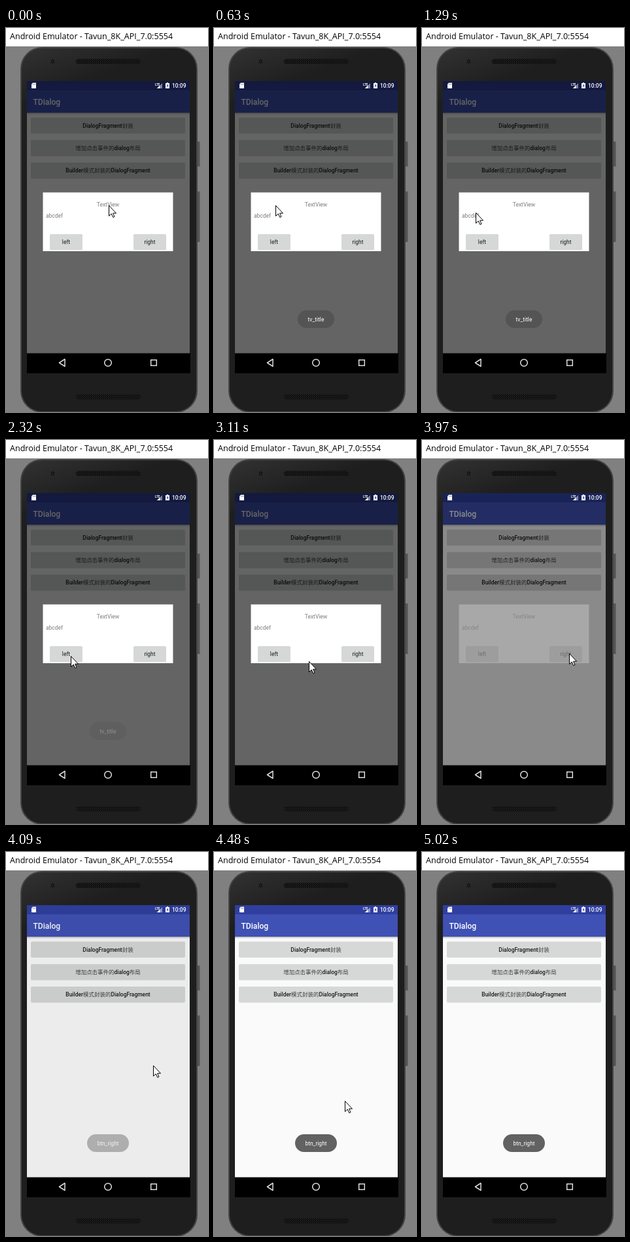
An HTML page for the animation above (5.76 s loop, 309 by 585 pixels).

```html
<!DOCTYPE html>
<html lang="en">
<head>
<meta charset="utf-8">
<title>Dialog demo</title>
<style>
  html, body { margin: 0; width: 100%; height: 100%; overflow: hidden; background: #808080; }
  svg { display: block; width: 100%; height: 100%; }
  text { font: 8.48px Roboto, "Noto Sans CJK SC", "Noto Sans CJK", sans-serif; }
  .medium { font-weight: 500; }
  .mid { text-anchor: middle; }
  .button { fill: #d6d7d7; }
  .label { fill: #1a1a1a; }
  .han { font-weight: 400; fill-opacity: .8; }
  .hint { fill: #7c7c7c; }
  .white { fill: #fff; }
</style>
</head>
<body>
<svg viewBox="0 0 309 585">
  <defs>
    <pattern id="mesh" width="3" height="3" patternUnits="userSpaceOnUse">
      <rect width="3" height="3" fill="#0b0b0b"/>
      <path d="M0 0h1v1h-1zM1.5 1.5h1v1h-1z" fill="#383838"/>
    </pattern>
    <linearGradient id="shade" x2="0" y2="1">
      <stop stop-opacity=".28"/>
      <stop offset="1" stop-opacity="0"/>
    </linearGradient>
    <linearGradient id="gloss" gradientUnits="userSpaceOnUse" x1="60" y1="30" x2="85" y2="95">
      <stop stop-color="#2f2f2f"/>
      <stop offset="1" stop-color="#1e1e1e"/>
    </linearGradient>
  </defs>

  <rect width="309" height="585" fill="#808080"/>
  <rect width="309" height="28" fill="#fff"/>
  <text x="6" y="17" style="font:12.55px 'Open Sans','Noto Sans',sans-serif">Android Emulator - Tavun_8K_API_7.0:5554</text>

  <g id="phone">
    <path d="M293 173h3.500v38h-3.500zM293 249h3.500v77h-3.500z" fill="#555"/>
    <rect x="22" y="29" width="271" height="557" rx="33" fill="#444"/>
    <rect x="24" y="31" width="267" height="553" rx="31" fill="url(#gloss)"/>
    <circle cx="71.500" cy="51" r="3.500" fill="#111" stroke="#2d2d2d"/>
    <circle cx="71.500" cy="51" r="1.200" fill="#333"/>
    <rect x="107" y="47" width="99" height="8" rx="4" fill="url(#mesh)"/>
    <rect x="107" y="558" width="99" height="8" rx="4" fill="url(#mesh)"/>
  </g>

  <g id="screen">
    <rect x="32" y="81" width="249" height="415" fill="#fafafa"/>
    <rect x="32" y="81" width="249" height="14" fill="#303f9f"/>
    <rect x="32" y="95" width="249" height="34" fill="#3f51b5"/>
    <rect x="32" y="129" width="249" height="3" fill="url(#shade)"/>
    <text class="white medium" x="41.500" y="117" style="font-size:12.100px">TDialog</text>
    <g id="menu"></g>
  </g>
  <rect id="dim" x="32" y="81" width="249" height="415"/>

  <g id="status" class="white">
    <path d="M41 83.500h5v8.500h-7v-6.500z"/>
    <path d="M41.300 85v1.700M43 85v1.700M44.700 85v1.700" stroke="#303f9f" stroke-width=".6"/>
    <text x="228" y="87.500" style="font-size:4.500px;font-weight:700">LTE</text>
    <path d="M231 92l8-8v8z" opacity=".45"/>
    <path d="M231 92l4.500-4.500v4.500z"/>
    <path d="M246 83h2v1h2v8h-6v-8h2z"/>
    <path d="M247.500 85l-2 3.400h1.400v2.400l2-3.400h-1.400z" fill="#303f9f"/>
    <text class="medium" x="254" y="91.200">10:09</text>
  </g>

  <g id="nav">
    <rect x="32" y="495.500" width="250" height="30.500"/>
    <g fill="none" stroke="#ddd" stroke-width="1.500">
      <path d="M90 504.500v11l-8.500-5.500z" stroke-linejoin="round"/>
      <circle cx="156" cy="510" r="5.300"/>
      <rect x="221.700" y="505.700" width="8.600" height="8.600"/>
    </g>
  </g>

  <g id="dialog">
    <rect x="56.500" y="250.500" width="199" height="89.500" fill="#fff"/>
    <text class="hint mid" x="156" y="271.500">TextView</text>
    <text class="hint" x="61" y="288.500">abcdef</text>
  </g>

  <g id="toast">
    <rect id="bubble" y="430" height="27" rx="13.500" fill="#535353" fill-opacity=".9"/>
    <text id="message" class="white mid" x="156" y="446.500"></text>
  </g>

  <path id="cursor" d="M.5.5V16.500L4.200 13 6.800 18.500 9 17.500 6.600 12.200H11.500Z" fill="#fff" stroke="#000"/>
</svg>

<script>
const LOOP = 5760;
const byId = id => document.getElementById(id);
const ramp = (time, from, to) => Math.min(1, Math.max(0, (time - from) / (to - from)));

// The pointer glides between a few stops, resting on each until it leaves.
const stops = [
  { leave: 150, x: 157, y: 270 },
  { arrive: 750, x: 79, y: 270 },
  { arrive: 900, x: 66, y: 275 },
  { arrive: 1290, leave: 1400, x: 82, y: 281 },
  { arrive: 1440, x: 61, y: 287 },
  { arrive: 1750, x: 109, y: 336 },
  { arrive: 2050, leave: 3000, x: 99, y: 329 },
  { arrive: 3270, x: 210, y: 349 },
  { arrive: 3540, leave: 4120, x: 225, y: 325 },
  { arrive: 4720, x: 183, y: 414 },
  { arrive: 4870, x: 228, y: 533 }
];
const cursorHidden = 5020;

function cursorAt(time) {
  let { x, y } = stops[0];
  stops.slice(1).forEach((stop, i) => {
    const previous = stops[i];
    const progress = ramp(time, previous.leave ?? previous.arrive, stop.arrive);
    x += (stop.x - previous.x) * progress;
    y += (stop.y - previous.y) * progress;
  });
  return [Math.round(x), Math.round(y)];
}

function addButton(parent, x, y, width, label, weight = "") {
  const text = label.replace(/[\u4e00-\u9fff]+/g, '<tspan class="han">$&</tspan>');
  parent.insertAdjacentHTML("beforeend", `
    <rect x="${x}" y="${y + 0.6}" width="${width}" height="24" rx="2" opacity=".1"/>
    <rect class="button" x="${x}" y="${y}" width="${width}" height="24" rx="2"/>
    <text class="label mid ${weight}" x="${x + width / 2}" y="${y + 15}">${text}</text>`);
}

["DialogFragment封装", "增加点击事件的dialog布局", "Builder模式封装的DialogFragment"]
  .forEach((label, i) => addButton(byId("menu"), 38, 136.5 + i * 34.3, 236, label, "medium"));

addButton(byId("dialog"), 67, 314, 50, "left");
addButton(byId("dialog"), 195, 314, 50, "right");

function setAttributes(id, attributes) {
  for (const name in attributes) byId(id).setAttribute(name, attributes[name]);
}

function draw(time) {
  const closing = time >= 3000;
  const width = closing ? 64 : 56;
  const toast = closing
    ? ramp(time, 3970, 4240)
    : ramp(time, 90, 600) - ramp(time, 2000, 2450);

  setAttributes("dim", { opacity: 0.6 * (1 - ramp(time, 3926, 4108)) });
  setAttributes("dialog", { opacity: 1 - ramp(time, 3930, 3985) });
  setAttributes("toast", { opacity: toast });
  setAttributes("bubble", { x: 156 - width / 2, width });
  byId("message").textContent = closing ? "btn_right" : "tv_title";
  setAttributes("cursor", {
    transform: `translate(${cursorAt(time)})`,
    visibility: time < cursorHidden ? "visible" : "hidden"
  });
}

const start = performance.now();
function tick() {
  draw((performance.now() - start) % LOOP);
  requestAnimationFrame(tick);
}
tick();
</script>
</body>
</html>
```
